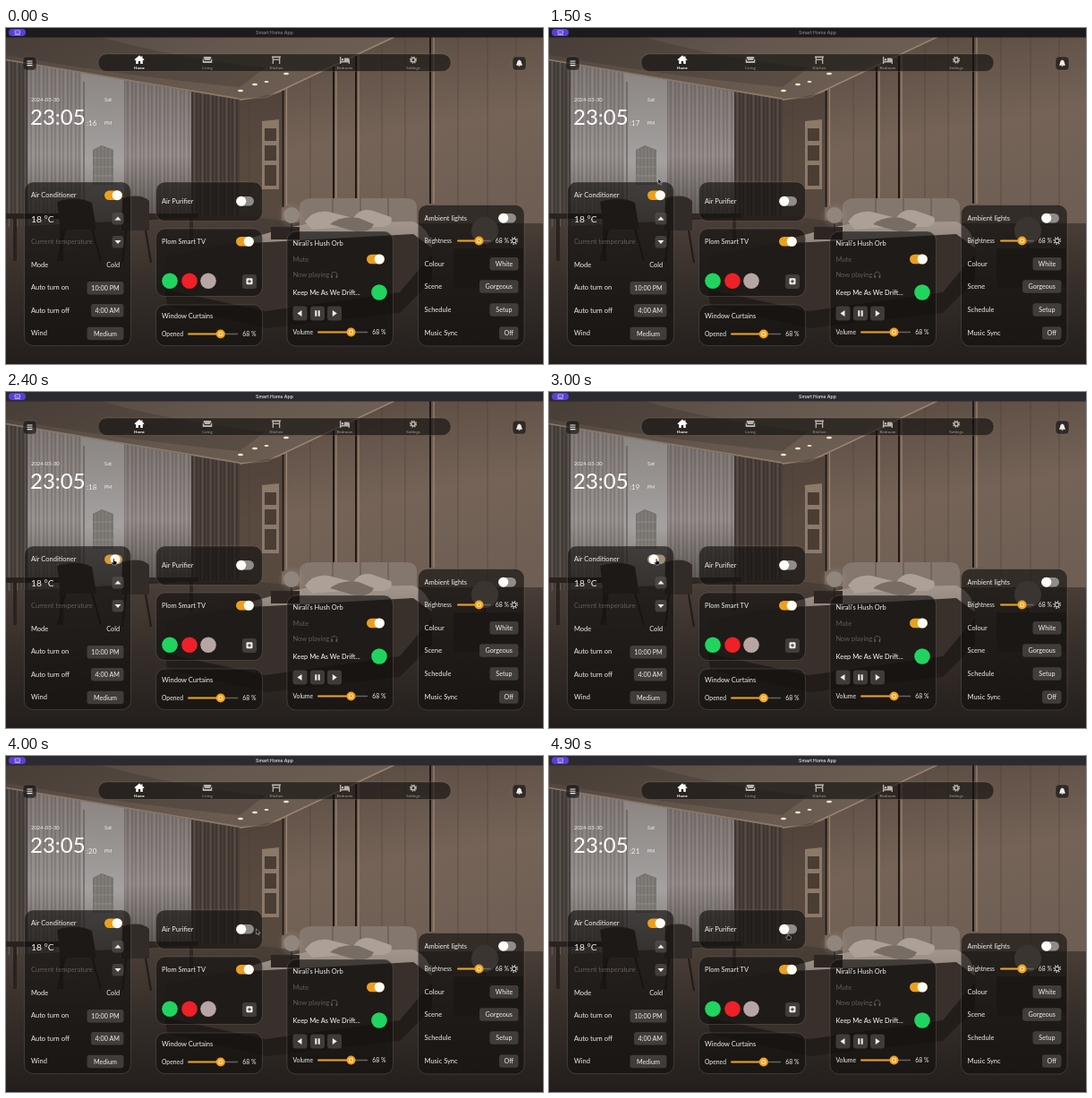
An HTML page that plays this animation: 600x375 px, repeating every 5000 ms.

```html
<!DOCTYPE html>
<html lang="en">
<head>
<meta charset="utf-8">
<title>Smart Home App</title>
<style>
html, body { margin: 0; width: 100%; height: 100%; overflow: hidden; background: #2a2420; }
svg { display: block; width: 600px; height: 375px; font-family: Lato, sans-serif; }
#title { font-family: Inter, sans-serif; font-weight: 600; }
.card { fill: #12100f; fill-opacity: .64; stroke: #a39a92; stroke-opacity: .34; stroke-width: .7; }
</style>
</head>
<body>
<svg viewBox="0 0 600 375">
  <defs>
    <linearGradient id="ceiling" x2="1" y2=".25">
      <stop offset="0" stop-color="#4f453e"/><stop offset=".4" stop-color="#65574d"/><stop offset="1" stop-color="#76665a"/>
    </linearGradient>
    <linearGradient id="wall" x2=".25" y2="1">
      <stop offset="0" stop-color="#56483e"/><stop offset=".55" stop-color="#756357"/><stop offset="1" stop-color="#6e5e53"/>
    </linearGradient>
    <linearGradient id="window" x2="0" y2="1">
      <stop offset="0" stop-color="#87827f"/><stop offset=".6" stop-color="#a5a1a0"/><stop offset="1" stop-color="#6f6965"/>
    </linearGradient>
    <linearGradient id="sheer" x2="0" y2="1">
      <stop offset="0" stop-color="#7b7370"/><stop offset=".55" stop-color="#948d8b"/><stop offset="1" stop-color="#5d5551"/>
    </linearGradient>
    <linearGradient id="floor" x2="0" y2="1">
      <stop offset="0" stop-color="#4b4038"/><stop offset=".5" stop-color="#352d28"/><stop offset="1" stop-color="#231e1c"/>
    </linearGradient>
    <linearGradient id="duvet" x2="0" y2="1">
      <stop offset="0" stop-color="#a3978d"/><stop offset="1" stop-color="#665b54"/>
    </linearGradient>
    <pattern id="folds" width="9" height="20" patternUnits="userSpaceOnUse">
      <path d="M1 0V20M6 0V20" stroke="#221d1a" stroke-opacity=".34" stroke-width="1.6"/>
      <path d="M3.500 0V20" stroke="#c7bbb2" stroke-opacity=".14" stroke-width="1.2"/>
    </pattern>
    <filter id="soft"><feGaussianBlur stdDeviation="2.5"/></filter>
  </defs>

  <g id="room">
    <path fill="url(#ceiling)" d="M0 10H600V100H0Z"/>
    <path fill="#3a312c" fill-opacity=".35" d="M0 10H105Q190 34 290 44L261 66Q120 52 0 30Z"/>
    <path fill="url(#window)" d="M0 36L150 61V225H0Z"/>
    <path fill="#77736f" d="M97 136L107 131L120 136V175H97Z"/>
    <path stroke="#98948f" stroke-width=".6" d="M100 136V175M104 134V175M108 133V175M112 134V175M116 136V175M97 145H120M97 155H120M97 165H120"/>
    <path stroke="#5d5651" stroke-width="1.2" d="M87 60V212"/>
    <path fill="#4d4540" d="M0 36L24 40V235H0Z"/>
    <path fill="url(#sheer)" fill-opacity=".75" d="M24 40L84 50V225H24Z"/>
    <path fill="url(#sheer)" d="M132 58L207 71V212H132Z"/>
    <path fill="#4b4039" d="M207 71L261 80V215H207Z"/>
    <path fill="url(#folds)" d="M0 36L24 40V235H0ZM207 71L261 80V215H207Z"/>
    <path fill="url(#folds)" opacity=".55" d="M24 40L84 50V225H24ZM132 58L207 71V212H132Z"/>
    <path fill="none" stroke="#8a7868" stroke-width="1.6" d="M0 35.500L261 79"/>
    <path fill="url(#wall)" d="M261 81L292 78L434 10H600V245H261Z"/>
    <path fill="none" stroke="#c1a78f" stroke-opacity=".55" stroke-width="1.4" d="M261 80L292 77L434 10"/>
    <path fill="#3f332b" fill-opacity=".5" d="M261 81L308 72V215H261Z"/>
    <path fill="#8b7969" d="M286 104L305 102V180H286Z"/>
    <path fill="#4a3d34" d="M289 112H302V126H289ZM289 131H302V148H289ZM289 153H302V176H289Z"/>
    <path stroke="#4a3c33" stroke-opacity=".7" stroke-width=".7" d="M272 80V205M340 56V195M420 18V195M446 10V195M505 10V205M538 10V210M570 10V200"/>
    <path stroke="#1e1815" stroke-width="2" d="M309.500 70V200M366 43V192M391 31V190M474 10V196"/>
    <path stroke="#b89a7e" stroke-opacity=".7" stroke-width="1.2" d="M313.500 68V198M369 42V190M394 30V190M478 10V196"/>
    <path fill="url(#floor)" d="M0 222L261 209L335 218H600V375H0Z"/>

    <path fill="#84776d" d="M328 197Q331 190 342 190H448Q458 190 459 199V245H328Z"/>
    <path stroke="#564b44" stroke-width=".8" d="M365 190V230M396 190V230M427 190V230"/>
    <path fill="url(#duvet)" d="M262 238Q305 224 340 218L455 216Q474 224 476 246L440 285L310 296L268 274Z"/>
    <path fill="#ada197" d="M334 216Q343 203 360 205L384 211Q388 219 377 222L342 225ZM388 212Q396 200 410 204L430 211Q434 219 421 222H395Z"/>
    <path fill="#786d65" d="M362 219Q375 209 394 212L411 219Q408 227 393 228Z"/>
    <path fill="#39302b" d="M178 256Q235 240 292 239L455 230L478 247L440 300L290 322L180 300Z"/>
    <path fill="#231d1a" d="M178 292L290 316L440 295L476 252V282L440 318L292 335L180 310Z"/>
    <path fill="#2d2521" d="M296 222H328V236H296ZM500 246H578V290H500Z"/>
    <path stroke="#211b18" stroke-width="1.5" d="M319 217V229M535 240V248"/>
    <circle cx="319" cy="209" r="12" fill="#b9a898" opacity=".2" filter="url(#soft)"/>
    <circle cx="319" cy="209" r="9" fill="#91867d"/>
    <circle cx="535" cy="226" r="15" fill="#85796f"/>

    <path fill="#29221e" d="M0 207H72V213H0ZM8 213H12V260H8ZM60 213H64V260H60Z"/>
    <path fill="#332b27" d="M57 194Q80 187 96 195L101 225H61ZM130 190Q150 184 160 193V226H129Z"/>
    <path fill="none" stroke="#211b18" stroke-width="2" d="M66 224L58 260M96 224L106 260M134 226L130 262M156 226L162 262"/>
    <path fill="#302823" d="M160 207H215V212H160ZM205 212H209V245H205Z"/>
    <g fill="#ffe9c7">
      <ellipse cx="262" cy="70" rx="3" ry="1.2"/><ellipse cx="278" cy="63" rx="3" ry="1.2"/>
      <ellipse cx="291" cy="60" rx="2.500" ry="1.1"/><ellipse cx="313" cy="51" rx="3" ry="1.2"/>
    </g>
  </g>

  <rect id="bar" width="600" height="10.500"/>
  <rect x="3" y="1" width="19" height="8" rx="4" fill="#5b40d6"/>
  <path fill="none" stroke="#d9d2ff" stroke-width=".7" d="M10 3H15.500V6H10ZM9.500 7.500H16"/>
  <g id="ui"></g>
  <g id="pointer">
    <path id="arrow" fill="#0b0b0b" stroke="#ddd" stroke-width=".5" d="M0 0V6.200L1.500 4.900L2.500 7L3.500 6.500L2.500 4.500H4.400Z"/>
    <path id="hand" fill="#0b0b0b" stroke="#ddd" stroke-width=".5" d="M-.7 .6Q0-.6 .7 .6V2.600L3 3.200Q3.700 3.500 3.500 4.400L2.900 7H-.6L-2.500 4.500Q-2.300 3.600-.7 4.300Z"/>
  </g>
</svg>
<script>
const $ = id => document.getElementById(id);
const ui = $("ui");
const WHITE = "#f1efed", DIM = "#635c57", AMBER = "#eaa01f", GREY = "#8f8c8a";

function add(tag, attrs, text) {
  const el = document.createElementNS("http://www.w3.org/2000/svg", tag);
  for (const key in attrs) el.setAttribute(key, attrs[key]);
  if (text) el.textContent = text;
  return ui.appendChild(el);
}
const label = (x, y, text, size = 7.5, fill = WHITE, anchor = "start", more) =>
  add("text", { x, y, "font-size": size, fill, "text-anchor": anchor, ...more }, text);
const box = (x, y, width, height, rx, fill = "#5a5550", opacity = .6) =>
  add("rect", { x, y, width, height, rx, fill, "fill-opacity": opacity });
const dot = (cx, cy, r, fill) => add("circle", { cx, cy, r, fill });
const ring = (cx, cy, r, stroke, width, more) =>
  add("circle", { cx, cy, r, fill: "none", stroke, "stroke-width": width, ...more });
const shape = (d, fill = WHITE, more) => add("path", { d, fill, ...more });
const line = (d, stroke = WHITE, width = 1, more) =>
  shape(d, "none", { stroke, "stroke-width": width, ...more });
const card = (x, y, width, height, rx = 10) =>
  add("rect", { x, y, width, height, rx, class: "card" });

function toggle(x, y, on) {
  const track = box(x, y - 5.2, 20, 10.4, 5.2, GREY, 1);
  const thumb = dot(0, y, 5.5, "#fffdf9");
  const set = k => {
    track.setAttribute("fill", `color-mix(in srgb, ${AMBER} ${k * 100}%, ${GREY})`);
    thumb.setAttribute("cx", x + 5.8 + k * 8.4);
  };
  set(on);
  return set;
}
function slider(x, y, length, at) {
  line(`M${x} ${y}H${x + length}`, "#68625e", 1.4, { "stroke-linecap": "round" });
  line(`M${x} ${y}H${at}`, AMBER, 2, { "stroke-linecap": "round" });
  dot(at, y, 5, "#f2a320");
  dot(at, y, 2.6, "#ffdf9c");
  dot(at, y, 1.2, "#e4931a");
  label(x + length + 21, y + 2.5, "68 %", 6.9, WHITE, "end");
}
function option(right, y, width, text) {
  box(right - width, y - 7, width, 14.5, 3);
  label(right - width / 2, y + 2.8, text, 7.2, WHITE, "middle");
}

const title = label(300, 7, "Smart Home App", 5.1, WHITE, "middle", { id: "title" });

// Navigation
card(103, 29, 394, 19.5, 9.5);
[[149, "Home"], [225, "Living"], [302, "Kitchen"], [378.5, "Bedroom"], [455, "Settings"]].forEach(([x, text], i) =>
  label(x, 46, text, 4.4, i ? "#a29b95" : "#fff", "middle", { "font-weight": i ? 400 : 700 }));
const ICON = "#b8b1ab";
shape("M149 30.500L143.500 35.300L144.300 36.200L145.200 35.500V40H147.800V37H150.200V40H152.800V35.500L153.700 36.200L154.500 35.300L152.500 33.500V31.500H151.200V32.400Z", "#fff");
shape("M221.500 32H228.500Q229.500 32 229.500 34Q228 34.200 228 36H222Q222 34.200 220.500 34Q220.500 32 221.500 32ZM219.700 34.700Q221.200 34.500 221.400 37H228.600Q228.800 34.500 230.300 34.700V39H219.700Z", ICON);
shape("M297 31.500H307V33.200H306.300V40H305V36H299V40H297.700V33.200H297ZM299 33.200V34.800H305V33.200Z", ICON, { "fill-rule": "evenodd" });
shape("M373 32H374.300V37H378V33.500H382Q384 33.500 384 36V40H382.700V38.500H374.300V40H373Z", ICON);
dot(376, 35.2, 1.3, ICON);
ring(455, 35.7, 2.2, ICON, 1.7);
ring(455, 35.7, 3.5, ICON, 1.2, { "stroke-dasharray": "1.5 1.25" });
card(19, 32, 15, 15, 4);
line("M23.500 37H29.500M23.500 39.300H29.500M23.500 41.600H29.500", WHITE, 1.1);
card(566, 32, 15, 15, 4);
shape("M573.500 35.500Q576 36.300 576 39L577 41.700H570L571 39Q571 36.300 573.500 35.500ZM572.400 42.200H574.600Q573.500 44 572.400 42.200Z");

// Clock
label(28, 82, "2024-03-30", 5.9);
label(110, 82, "Sat", 5.9);
label(27, 108.3, "23:05", 24, "#fff");
const seconds = label(90, 108.5, ":16", 8, WHITE);
label(110, 108, "PM", 5.5);

// Air conditioner
card(20.5, 172, 119, 182.5);
label(28, 189.3, "Air Conditioner");
const cooling = toggle(110, 186.7, 1);
label(28, 216.7, "18 °C", 10.2);
box(118.5, 206, 13, 13.5, 3);
shape("M121.500 214.500L125 210.500L128.500 214.500Z");
label(28, 241.3, "Current temperature", 7.6, DIM);
box(118.5, 232, 13, 13.5, 3);
shape("M121.500 237L125 241L128.500 237Z");
label(28, 267, "Mode");
label(127, 267, "Cold", 7.3, WHITE, "end");
label(28, 292.3, "Auto turn on");
option(131.5, 290, 41, "10:00 PM");
label(28, 317.5, "Auto turn off");
option(131.5, 315, 36.5, "4:00 AM");
label(28, 343, "Wind");
option(131.5, 340.7, 41, "Medium");

// Air purifier
card(167.5, 172, 119, 43.5);
label(174, 196, "Air Purifier");
toggle(257, 193.3, 0);

// Television
card(167.5, 224, 119, 75.5);
label(174, 241, "Plom Smart TV");
toggle(257, 238.3, 1);
[[183, "#20d45f"], [205, "#ee2028"], [226, "#b7a5a3"]].forEach(([x, fill]) => dot(x, 282.3, 8.8, fill));
box(264, 275, 16, 16, 3);
box(268.5, 279.3, 7, 7, 1.2, WHITE, 1);
line("M272 280.800V284.800M270 282.800H274", "#302b28", 1);

// Curtains
card(167.5, 309, 119, 45.5);
label(174, 324.2, "Window Curtains");
label(174, 344, "Opened", 6.8);
slider(204, 341.5, 54.5, 239.8);

// Speaker
card(314, 227, 118.5, 128);
label(320.5, 243, "Nirali's Hush Orb");
label(320.5, 260.8, "Mute", 7.5, DIM);
toggle(403, 258, 1);
label(320.5, 278.4, "Now playing", 7.5, DIM);
line("M363.600 276.800V275.500A3.200 3.200 0 0 1 370 275.500V276.800", DIM, .8);
line("M364.200 276V279M369.400 276V279", DIM, 1.5);
label(320.5, 298, "Keep Me As We Drift...", 7.5, "#fff");
dot(417, 295, 8.8, "#20d45f");
[320.5, 340, 359].forEach(x => box(x, 310.5, 16, 16, 3));
shape("M330.500 315V322L325.500 318.500Z");
line("M346.300 315.300V321.700M349.700 315.300V321.700", WHITE, 2);
shape("M364.800 315V322L369.800 318.500Z");
label(320.5, 342, "Volume", 6.8);
slider(349, 339.5, 54.5, 385.5);

// Lights
card(460.5, 197.5, 118.5, 157.5);
label(467.5, 215, "Ambient lights");
toggle(550, 212.2, 0);
label(467.5, 240, "Brightness", 6.6);
slider(505, 237.5, 36, 528.5);
ring(567.7, 237.5, 3.7, WHITE, 1.4, { "stroke-dasharray": "1.1 1.8" });
ring(567.7, 237.5, 2.3, WHITE, 1);
[["Colour", "White", 32, 263], ["Scene", "Gorgeous", 43.5, 288.3], ["Schedule", "Setup", 32, 314.3], ["Music Sync", "Off", 21.5, 340.3]]
  .forEach(([name, value, width, y]) => {
    label(467.5, y + 2.6, name);
    option(572.5, y, width, value);
  });

// Pointer stops: time, x, y
const stops = [
  [0, 524, 20], [500, 297, 65], [600, 296, 64], [1500, 122, 168], [1900, 120.5, 186],
  [3300, 120, 186], [3800, 284, 191], [4400, 267, 198]
];
const LOOP = 5000, STEP = 100;
const clamp = v => Math.min(1, Math.max(0, v));
const ease = v => v * v * (3 - 2 * v);
const ramp = (t, from, to) => ease(clamp((t - from) / (to - from)));

function pointerAt(t) {
  const next = stops.findIndex(s => s[0] > t);
  if (next < 0) return stops.at(-1).slice(1);
  const [t0, x0, y0] = stops[next - 1], [t1, x1, y1] = stops[next];
  const k = ramp(t, t0, t1);
  return [x0 + (x1 - x0) * k, y0 + (y1 - y0) * k];
}

function draw(t) {
  const focused = t >= 1800;
  title.setAttribute("fill", focused ? "#d9d6da" : "#7c777b");
  $("bar").setAttribute("fill", focused ? "#2b2a2e" : "#1d1a1e");
  seconds.textContent = ":" + (16 + Math.floor((t + 300) / 1000));
  cooling(1 - ramp(t, 2320, 2560) + ramp(t, 2940, 3180));
  const [x, y] = pointerAt(t);
  const over = (t >= 1800 && t < 3400) || t >= 4200;
  $("pointer").setAttribute("transform", `translate(${x} ${y})`);
  $("pointer").setAttribute("visibility", t < 100 ? "hidden" : "visible");
  $("arrow").setAttribute("opacity", over ? 0 : 1);
  $("hand").setAttribute("opacity", over ? 1 : 0);
}

const start = performance.now();
(function tick() {
  const t = (performance.now() - start) % LOOP;
  draw(Math.floor(t / STEP) * STEP);
  requestAnimationFrame(tick);
})();
</script>
</body>
</html>
```
